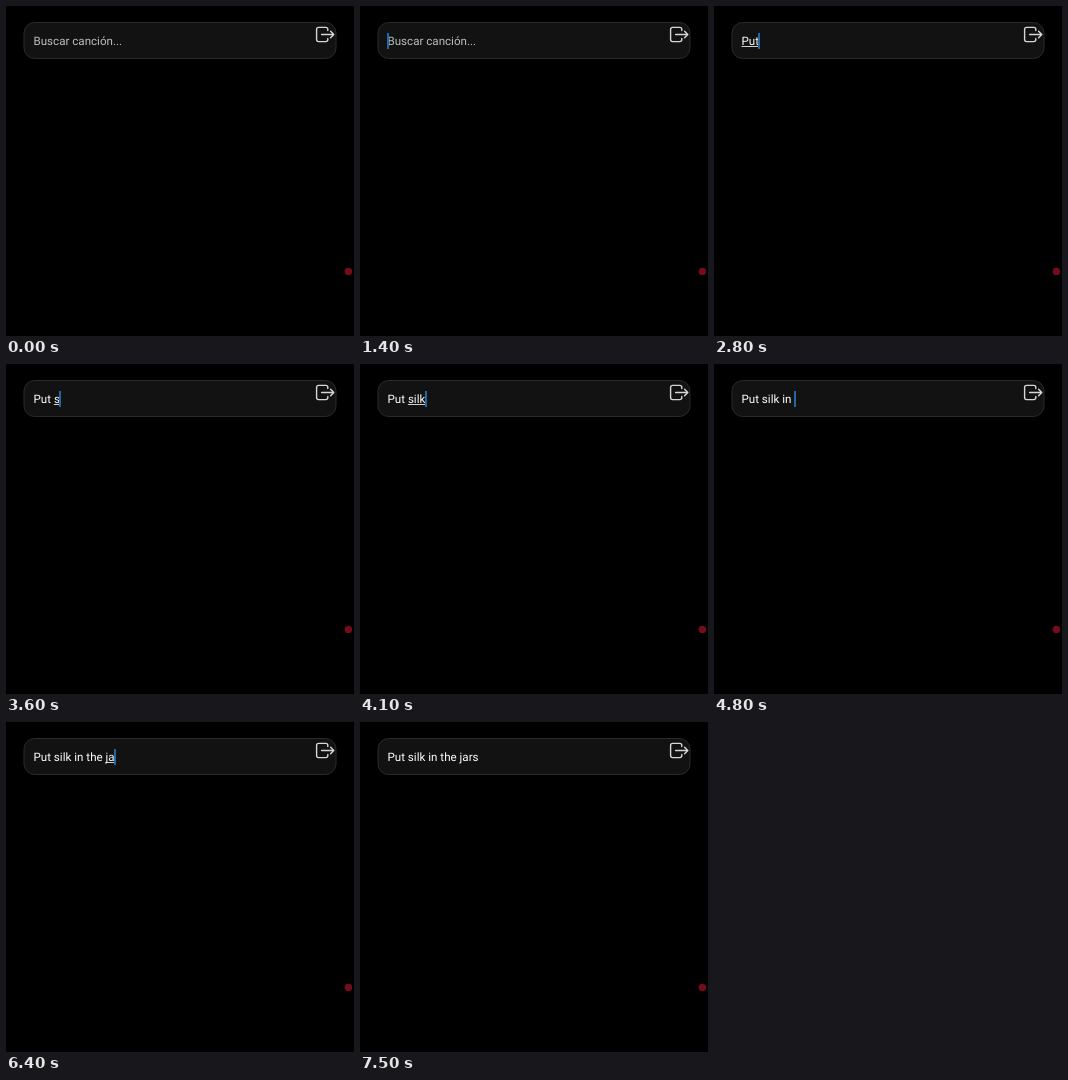
Animation, 348 px wide and 330 px high, one loop 8000 ms. Source, as an HTML page:

```html
<!DOCTYPE html>
<html lang="es">
<head>
<meta charset="utf-8">
<title>Buscar canción</title>
<style>
  html, body { margin: 0; width: 100%; height: 100%; overflow: hidden; background: #000; }
  .stage { position: relative; width: 348px; height: 330px; overflow: hidden; }
  svg { position: absolute; inset: 0; }
  .line {
    position: absolute; left: 27.5px; top: 28px; height: 14px;
    font: 11.6px/14px Roboto, sans-serif;
    text-rendering: geometricPrecision;
    white-space: pre; color: #fff;
  }
  .hint { color: #bebebe; }
  .word { text-decoration: underline 1px #d0d0d0; text-underline-offset: 1.3px; text-decoration-skip-ink: none; }
  .caret { position: absolute; top: -1px; width: 2px; height: 16px; margin-left: -.6px; background: #2467a6; }
</style>
</head>
<body>
<div class="stage">
  <svg width="348" height="330" fill="none">
    <rect x="18" y="16.5" width="312" height="36" rx="10.5" fill="#121212" stroke="#2a2a2a"/>
    <circle cx="342.4" cy="265.4" r="3.7" fill="#760b1b"/>
    <g stroke="#d6d6d6" stroke-width="1.4" stroke-linecap="round" stroke-linejoin="round">
      <path d="M321.8 24.6V23.4a2 2 0 0 0-2-2h-7.2a2 2 0 0 0-2 2v10.2a2 2 0 0 0 2 2h7.2a2 2 0 0 0 2-2v-1.2"/>
      <path d="M315.6 28.5h12M324.6 25.2l3.2 3.3-3.2 3.3"/>
    </g>
  </svg>
  <div class="line hint" id="hint">Buscar canción...</div>
  <div class="line"><span id="done"></span><span class="word" id="word"></span><span class="caret" id="caret"></span></div>
</div>
<script>
  const LOOP = 8000;
  const QUERY = "Put silk in the jars";
  // Moment at which each character is typed
  const KEYS = [2400, 2600, 2800, 3000, 3600, 3700, 3900, 4000, 4200, 4400,
                4600, 4800, 5100, 5300, 5400, 5600, 5800, 6300, 6900, 7100];
  const COMMIT = 7300;
  const CARET_ON = [[1400, 1900], [2400, 7500]];

  const [hint, done, word, caret] =
    ["hint", "done", "word", "caret"].map(id => document.getElementById(id));

  function draw(t) {
    const typed = QUERY.slice(0, KEYS.filter(k => k <= t).length);
    const split = t >= COMMIT ? typed.length : typed.lastIndexOf(" ") + 1;
    const visible = CARET_ON.some(([from, to]) => t >= from && t < to);
    done.textContent = typed.slice(0, split);
    word.textContent = typed.slice(split);
    hint.style.visibility = typed ? "hidden" : "visible";
    caret.style.visibility = visible ? "visible" : "hidden";
  }

  const start = performance.now();
  function frame() {
    draw((performance.now() - start) % LOOP);
    requestAnimationFrame(frame);
  }
  frame();
</script>
</body>
</html>
```
